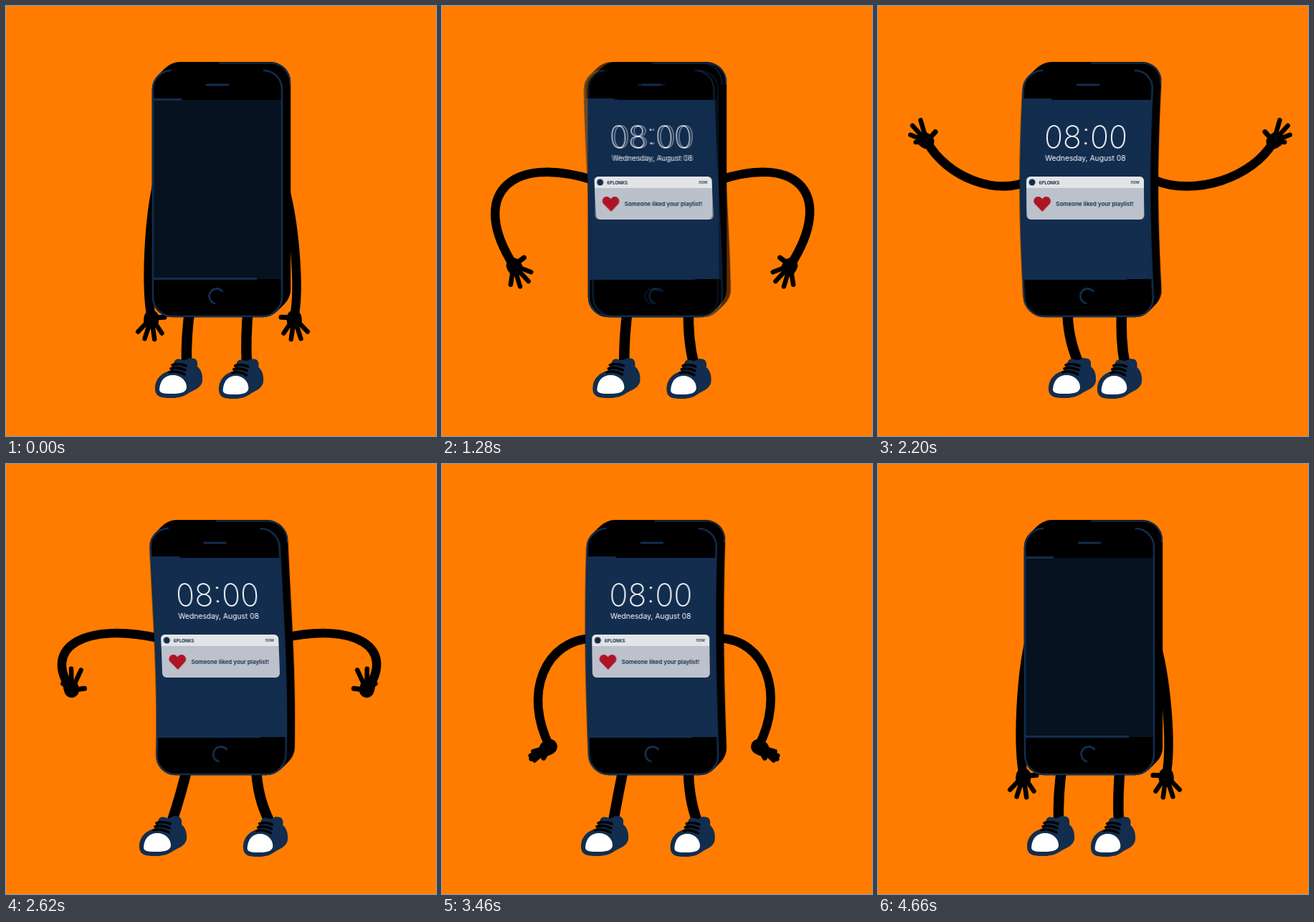
An HTML page with a canvas for the animation above (4800 ms loop, 600 by 600 pixels).

```html
<!DOCTYPE html>
<html lang="en">
<head>
<meta charset="utf-8">
<title>Dancing phone</title>
<style>
html, body { margin: 0; width: 100%; height: 100%; overflow: hidden; background: #ff7c00; }
canvas { display: block; width: 600px; height: 600px; }
</style>
</head>
<body>
<canvas id="stage" width="600" height="600"></canvas>
<script>
const LOOP = 4800;
const ORANGE = '#ff7c00', NAVY = '#122d4e', DARK = '#06121f';
const ctx = document.getElementById('stage').getContext('2d');
const sprite = document.createElement('canvas');
sprite.width = sprite.height = 600;
const phone = sprite.getContext('2d');

const ramp = (t, from, to) => Math.min(1, Math.max(0, (t - from) / (to - from)));
const ease = (t, from, to) => {
  const s = ramp(t, from, to);
  return s * s * (3 - 2 * s);
};
const mix = (a, b, s) => a + (b - a) * s;

// Left arm poses; axis mirrors the pose to the right, fold -1 turns the hand over.
const rest  = { x: 203, y: 435, bendX: 186, bendY: 350, axis: 302.5, turn: 95, fold: 1 };
const loose = { x: 177, y: 417, bendX: 125, bendY: 284, axis: 297, turn: 92, fold: 1 };
const raise = { x: 100, y: 362, bendX: -25, bendY: 168, axis: 293, turn: 60, fold: 1 };
const out   = { x: 38, y: 232, bendX: 130, bendY: 248, axis: 299.5, turn: 190, fold: -1 };
const up    = { x: 68, y: 189, bendX: 124, bendY: 290, axis: 310, turn: 215, fold: -1 };
const flip  = { x: 98, y: 350, bendX: -25, bendY: 172, axis: 294, turn: 267, fold: -1 };

// Moves run one after another: [start, end, pose].
const armMoves = lag => [
  [480, 660, loose], [640, 1250, raise], [1300, 1640 + lag, out], [1640 + lag, 2190, up],
  [2200, 2800, flip], [3180, 3640, loose], [3640, 3860, rest]
];
const leftMoves = armMoves(0), rightMoves = armMoves(340);

function armPose(moves, t) {
  const pose = { ...rest };
  for (const [from, to, goal] of moves) {
    const s = ease(t, from, to);
    for (const part in pose) pose[part] = mix(pose[part], goal[part], s);
  }
  return pose;
}

function line(c, path, color, width) {
  c.strokeStyle = color;
  c.lineWidth = width;
  c.lineCap = c.lineJoin = 'round';
  c.stroke(new Path2D(path));
}

function shape(c, path, color) {
  c.fillStyle = color;
  c.fill(new Path2D(path));
}

function box(c, x, y, w, h, r, color) {
  c.fillStyle = color;
  c.beginPath();
  c.roundRect(x, y, w, h, r);
  c.fill();
}

function label(text, x, y, font, color, align) {
  phone.font = font + ' Inter, sans-serif';
  phone.fillStyle = color;
  phone.textAlign = align;
  phone.fillText(text, x, y);
}

function drawHand(x, y, turn, fold, side) {
  const ray = (angle, length) => {
    const a = angle * Math.PI / 180;
    return `${x + side * length * Math.cos(a)} ${y + length * Math.sin(a)}`;
  };
  line(ctx, `M${x} ${y}L${ray(turn, 5)}`, '#000', 21);
  line(ctx, `M${x} ${y}L${ray(turn - 97 * fold, 18)}`, '#000', 7);
  const longest = 0.9 + 0.7 * fold;
  for (let i = 0; i < 4; i++) {
    const angle = turn + fold * 26 * (i - 1.5);
    const length = 31 - 2 * (i - longest) ** 2;
    line(ctx, `M${x} ${y}L${ray(angle, length)}`, '#000', 6.5);
  }
}

function drawArm(pose, side) {
  const mirror = x => side > 0 ? x : 2 * pose.axis - x;
  const x0 = side > 0 ? 212 : 386, y0 = 243;
  const x = mirror(pose.x), y = pose.y;
  const bx = mirror(pose.bendX), by = pose.bendY;
  line(ctx, `M${x0} ${y0}C${(x0 + bx) / 2} ${(y0 + by) / 2} ${(x + bx) / 2} ${(y + by) / 2} ${x} ${y}`, '#000', 12.5);
  drawHand(x, y, pose.turn, pose.fold, side);
}

function drawShoe(x, y, scale) {
  ctx.save();
  ctx.translate(x, y);
  ctx.scale(scale, 1);
  ctx.translate(-208, 0);
  shape(ctx, 'M208 534C208 519 219 511 229 509L235 496Q237 491 244 493Q250 496 256 491L263 492Q268 494 267 503Q273 508 274 517V524C272 533 262 536 255 540C248 545 240 547 232 547C220 547 208 547 208 534Z', NAVY);
  shape(ctx, 'M214 535C215 521 223 515 233 515C244 515 252 523 252 532C252 539 243 541 233 541C222 541 214 541 214 535Z', '#fff');
  for (let i = 0; i < 3; i++) {
    line(ctx, `M${232 - 2 * i} ${501 + 5 * i}q9 -3 ${19 + i} ${1 + i}`, '#000', 3.6);
  }
  ctx.restore();
}

// Feet step wide, come together, step wide again and return.
function drawLegs(t, sway) {
  const wide = ease(t, 480, 740) - ease(t, 3200, 3840);
  const apart = ease(t, 2200, 2600);
  const l = -22 * wide + 52 * (ease(t, 1080, 1500) - apart);
  const r = 34 * wide - 25 * (ease(t, 1000, 1440) - apart);
  const hip = sway / 2;
  line(ctx, `M${257 + l * 0.25 + hip} 420Q${251 + l * 0.4 + hip} 460 ${252 + l * 0.95} 500`, '#000', 14.5);
  line(ctx, `M${338 + r * 0.25 + hip} 420Q${334 + r * 0.4 + hip} 465 ${336 + r * 0.95} 500`, '#000', 14.5);
  drawShoe(208 + l, 0, 1);
  drawShoe(297 + r, 1, 0.94);
}

function drawScreen(light) {
  box(phone, 204, 131, 181, 250, 0, NAVY);
  label('08:00', 295, 198, '200 43px', '#fff', 'center');
  label('Wednesday, August 08', 295, 215.5, '400 10.3px', '#fff', 'center');
  box(phone, 213, 238, 164, 60, 6, '#bcc1cb');
  box(phone, 213, 238, 164, 16, [6, 6, 0, 0], '#e3e4e7');
  box(phone, 216.5, 241.5, 9, 9, 4.5, NAVY);
  label('6PLONKS', 230.5, 248.5, '700 6.1px', NAVY, 'left');
  label('now', 371, 248.3, '500 6.2px', NAVY, 'right');
  shape(phone, 'M235 287L224.5 276C221 271 225 266 229.5 266Q233 266 235 269.5Q237 266 240.5 266C245 266 249 271 245.5 276Z', '#ae1425');
  label('Someone liked your playlist!', 254, 278.5, '600 8px', NAVY, 'left');
  phone.globalAlpha = 1 - light;
  box(phone, 204, 131, 181, 250, 0, DARK);
  phone.globalAlpha = 1;
}

function drawPhone(light) {
  phone.clearRect(0, 0, 600, 600);
  for (let i = 0; i < 12; i++) box(phone, 203.7 + i, 89 - i, 182.5, 345.3, 28, '#000');
  drawScreen(light);
  line(phone, 'M230 90A26 26 0 0 0 205 116V406A27 27 0 0 0 232 433H358A27 27 0 0 0 385 406V116A26 26 0 0 0 360 90', NAVY, 2.6);
  line(phone, 'M298 79.5H368A27 27 0 0 1 396 109', NAVY, 2);
  line(phone, 'M280 110H310M206 130.5H244M206 380.5H349M302 398A10.5 10.5 0 1 0 291 415', NAVY, 2.8);
}

// A sideways wave runs along the height of the phone.
function waveAt(t, y) {
  const phase = -Math.PI / 2 + (t - 1280) / 910 * 1.5 * Math.PI;
  return 6 * (1 - ease(t, 3300, 3700)) * Math.sin(phase + Math.PI * (y - 78) / 356);
}

function placePhone(t, blend) {
  if (blend < 1 || t >= 3700) ctx.drawImage(sprite, 0, 0);
  if (blend === 0 || t >= 3700) return;
  ctx.globalAlpha = blend;
  for (let y = 76; y < 437; y++) {
    ctx.drawImage(sprite, 180, y, 240, 1, 180 + waveAt(t, y), y, 240, 1);
  }
  ctx.globalAlpha = 1;
}

function frame(now) {
  const t = now % LOOP;
  const blend = ramp(t, 1200, 1325);
  ctx.fillStyle = ORANGE;
  ctx.fillRect(0, 0, 600, 600);
  drawLegs(t, blend * waveAt(t, 434));
  drawArm(armPose(leftMoves, t), 1);
  drawArm(armPose(rightMoves, t), -1);
  drawPhone(ease(t, 480, 940) - ease(t, 3980, 4650));
  placePhone(t, blend);
}

const start = performance.now();
function tick() {
  frame(performance.now() - start);
  requestAnimationFrame(tick);
}
tick();
</script>
</body>
</html>
```
